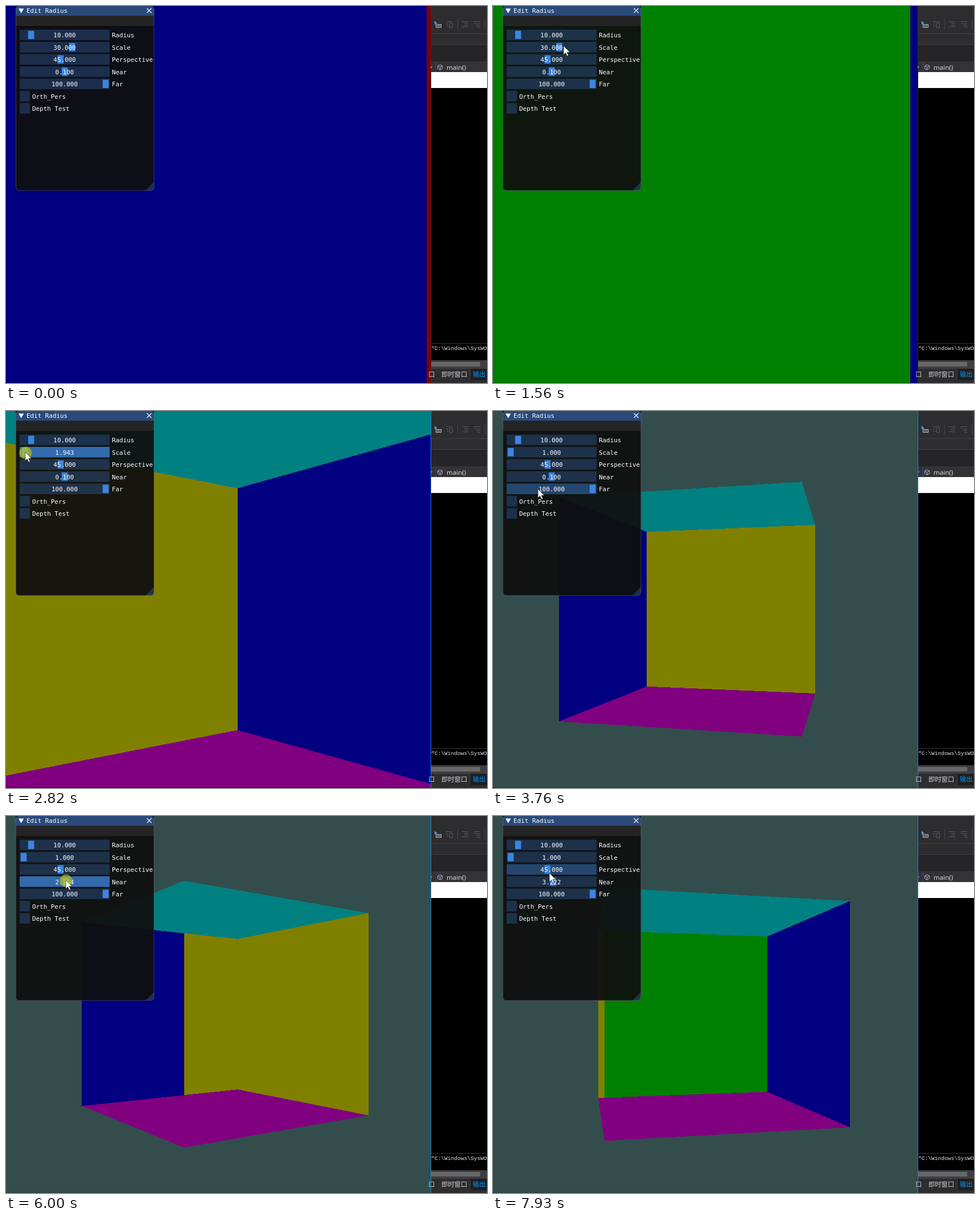
Animation, 845 px wide and 662 px high, one loop 8000 ms. Source, as an HTML page:

```html
<!DOCTYPE html>
<html lang="zh">
<head>
<meta charset="utf-8">
<title>Edit Radius</title>
<style>
  html, body { margin: 0; width: 100%; height: 100%; overflow: hidden; background: #334d4d; }
  svg { display: block; width: 845px; height: 662px; }
  text { white-space: pre; }
  .gui text { font: 10.9px "DejaVu Sans Mono", monospace; fill: #fff; }
  .crisp { shape-rendering: crispEdges; }
  .mid { text-anchor: middle; }
  .cjk { font: 11.3px "Noto Sans CJK SC", "Noto Sans CJK", sans-serif; }
</style>
</head>
<body>
<svg viewBox="0 0 845 662">
  <clipPath id="view"><rect width="746" height="662"/></clipPath>
  <g clip-path="url(#view)">
    <rect width="746" height="662" fill="#334d4d"/>
    <g id="cube" class="crisp"></g>
    <rect y="660" width="746" height="2" opacity=".12"/>
  </g>

  <g id="side">
    <g class="crisp">
      <rect x="746" width="99" height="662" fill="#2d2d30"/>
      <path d="M747 48.5h98M747 67.5h98" stroke="#414146"/>
      <rect x="747" y="68" width="98" height="29" fill="#252527"/>
      <rect x="747" y="97" width="98" height="19" fill="#333337"/>
      <path d="M755.5 98v18" stroke="#48484d"/>
      <rect x="747" y="116" width="98" height="28" fill="#fff"/>
      <rect x="747" y="144" width="98" height="478"/>
      <rect x="747" y="622" width="98" height="15" fill="#3e3e42"/>
      <rect x="747" y="625" width="86" height="8" fill="#686868"/>
      <rect x="747" y="637" width="98" height="25" fill="#2d2d30"/>
      <rect x="816" y="637" width="29" height="20" fill="#1e1e20"/>
      <path d="M815.5 638v19" stroke="#3f3f46"/>
      <path d="M747 592.5h98" stroke="#333"/>
    </g>
    <g fill="none" stroke="#5a5a5e">
      <path d="M793.5 23v18M841.5 23v18" stroke="#46464a"/>
      <path d="M773 27.5h11M773 31.5h4M779.5 30v8h5v-8zM774 35.5h4"/>
      <path d="M801 27.5h11M805 30.5h7M805 33.5h7M801 36.5h11"/>
      <path d="M822 27.5h11M826 31.5h7M826 34.5h7M828 37.5h5M822 29l3 3"/>
      <path d="M755.5 32.5h9v5h-9zM757 35h6" stroke="#d0d0d0"/>
      <path d="M753 26v7l2-2h3z" fill="#55aaff" stroke="none"/>
      <path d="M762.5 103l4 2.2v4.6l-4 2.2-4-2.2v-4.6zM758.5 105.2l4 2.3 4-2.3M762.5 107.5v4.5" stroke="#a8b4d8"/>
    </g>
    <path d="M746 106h3l-3 4z" fill="#999"/>
    <text x="774" y="112" fill="#e4e4e4" style="font:11.6px 'Open Sans',sans-serif">main()</text>
    <text x="747" y="604" fill="#e8e8e8" style="font:9.6px 'Liberation Mono',monospace">“C:\Windows\SysWOW64</text>
    <text class="cjk" x="742" y="651" fill="#d0d0d0">口</text>
    <text class="cjk" x="765" y="651" fill="#d0d0d0">即时窗口</text>
    <text class="cjk" x="820" y="651" fill="#0097fb">输出</text>
  </g>
  <path id="edge" class="crisp" d="M746.5 0v662" stroke="#1883d7"/>

  <g class="gui">
    <path d="M17 0H260V318a6 6 0 0 1-6 6H23a6 6 0 0 1-6-6z" fill="#0f0f0f" fill-opacity=".94"/>
    <path d="M17 17V4a6 6 0 0 1 4-4H256a6 6 0 0 1 4 4V17z" fill="#294a7a"/>
    <rect x="17" y="17" width="243" height="18" fill="#242424"/>
    <path d="M260 309v9a6 6 0 0 1-6 6h-9z" fill="#4296fa" fill-opacity=".25"/>
    <path d="M17.5 3V318a6 6 0 0 0 6 6H254a6 6 0 0 0 6-6V3" fill="none" stroke="#6e6e80" stroke-opacity=".5"/>
    <path d="M22 4.5h9.4l-4.7 8z" fill="#fff"/>
    <path d="M247.5 4l8 8m0-8l-8 8" stroke="#fff" stroke-width="1.1"/>
    <text x="36" y="12">Edit Radius</text>
    <g id="rows"></g>
  </g>

  <circle id="press" r="11" fill="#c8c400" fill-opacity=".65"/>
  <path id="mouse" d="M0 0V15.6l3.6-3.4 2.5 5.7 2.4-1-2.5-5.6h5z" fill="#fff" stroke="#222" stroke-width=".7"/>
</svg>

<script>
const $ = id => document.getElementById(id);
const make = (parent, tag, attrs, text) => {
  const el = document.createElementNS('http://www.w3.org/2000/svg', tag);
  for (const k in attrs) el.setAttribute(k, attrs[k]);
  if (text) el.textContent = text;
  return parent.appendChild(el);
};

const LOOP = 8000, RAD = Math.PI / 180;
const FRAME = 'rgba(41,74,122,.54)', HOVER = 'rgba(66,150,250,.4)', ACTIVE = 'rgba(66,150,250,.67)';

// Sliders: label, lower bound, upper bound, value
const sliders = [
  ['Radius', 1, 100, 10], ['Scale', 1, 50, 30], ['Perspective', 0, 100, 45],
  ['Near', -100, 100, .1], ['Far', -100, 100, 100]
].map(([label, lo, hi, value], i) => {
  const y = 41.5 + i * 21.5, rows = $('rows');
  const bar = make(rows, 'rect', { x: 24, y, width: 158, height: 18.5 });
  const grab = make(rows, 'rect', { y: y + 2, width: 10.5, height: 14.5 });
  const text = make(rows, 'text', { x: 103, y: y + 13.5, class: 'mid' });
  make(rows, 'text', { x: 186, y: y + 13.5 }, label);
  return { lo, hi, value, y, bar, grab, text };
});
['Orth_Pers', 'Depth Test'].forEach((label, i) => {
  const y = 149 + i * 21.5;
  make($('rows'), 'rect', { x: 24, y, width: 18, height: 18.5, fill: FRAME });
  make($('rows'), 'text', { x: 46, y: y + 13.5 }, label);
});

// Mouse path: step, x, y
const path = [
  [15, 743, 250], [16, 755, 240], [17, 520, 170], [18, 300, 110], [19, 150, 76], [20, 124, 70],
  [23, 117, 70], [25, 117, 70], [36, 33.77, 72], [38, 30.5, 72], [40, 31, 73], [48, 79, 137],
  [55, 84, 137], [58, 100, 126.5], [60, 103, 115], [63, 103.07, 114], [66, 103.07, 113],
  [69, 114, 113], [70, 87, 113], [71, 87, 113], [74, 104, 113], [78, 105.32, 112],
  [93, 105.32, 112], [98, 99, 100], [102, 99, 100]
];
function mouseAt(n) {
  const i = path.findIndex(p => p[0] >= n);
  if (i < 1) return path[0].slice(1);
  const [a, x, y] = path[i - 1], [b, u, v] = path[i], k = (n - a) / (b - a);
  return [x + (u - x) * k, y + (v - y) * k];
}

// Drags: slider index, first step, release step
const drags = [[1, 25, 39], [3, 66, 90]];
function valueAt(i, n) {
  const s = sliders[i], drag = drags.find(d => d[0] === i);
  if (!drag || n < drag[1]) return s.value;
  const k = (mouseAt(Math.min(n, drag[2]))[0] - 31) / 144;
  return s.lo + (s.hi - s.lo) * Math.min(1, Math.max(0, k));
}

// Faces in paint order; there is no depth test
const wall = c => [[c - 45, 1], [c + 45, 1], [c + 45, -1], [c - 45, -1]];
const lid = s => [45, 135, 225, 315].map(c => [c, s]);
const faces = [
  ['#800000', wall(180)], ['#008000', wall(0)], ['#000080', wall(90)],
  ['#808000', wall(270)], ['#800080', lid(-1)], ['#008080', lid(1)]
].map(([fill, pts]) => ({ pts, el: make($('cube'), 'polygon', { fill }) }));

function clip(pts, near) {
  const out = [];
  pts.forEach((p, i) => {
    const q = pts[(i + 1) % pts.length];
    if (p[2] >= near) out.push(p);
    if ((p[2] >= near) !== (q[2] >= near)) {
      const k = (near - p[2]) / (q[2] - p[2]);
      out.push(p.map((v, j) => v + (q[j] - v) * k));
    }
  });
  return out;
}

function drawCube(n, scale, near) {
  const look = 110.35 - 4.483 * n, half = 2 * scale, r = half * Math.SQRT2;
  for (const { pts, el } of faces) {
    const world = pts.map(([c, s]) => {
      const d = (c - look) * RAD;
      return [r * Math.sin(d), half * s, 10 + r * Math.cos(d)];
    });
    // A negative near plane hides everything
    const seen = near < 0 ? [] : clip(world, Math.max(near, .05));
    el.setAttribute('points', seen.map(([x, y, z]) =>
      (373 + 901 * x / z).toFixed(2) + ',' + (348 - 845 * y / z).toFixed(2)).join(' '));
  }
}

// The picture advances in steps with one longer pause
function stepAt(t) {
  if (t < 2080) return Math.min(25, Math.floor(t / 78));
  if (t < 2820) return 26 + Math.floor((t - 2080) / 74);
  return Math.min(102, 36 + Math.floor((t - 2820) / 77.3));
}

function draw(n) {
  const [mx, my] = mouseAt(n);
  const drag = drags.find(d => n >= d[1] && n < d[2]);
  sliders.forEach((s, i) => {
    const v = valueAt(i, n), active = drag && drag[0] === i;
    const over = !drag && n > 20 && mx > 24 && mx < 182 && my >= s.y && my < s.y + 18.5;
    s.bar.setAttribute('fill', active ? ACTIVE : over ? HOVER : FRAME);
    s.grab.setAttribute('fill', active ? '#4296fa' : '#3d85e0');
    s.grab.setAttribute('x', 25.8 + 144 * (v - s.lo) / (s.hi - s.lo));
    s.text.textContent = v.toFixed(3);
  });
  drawCube(n, valueAt(1, n), valueAt(3, n));
  const place = (el, x, y, on) => {
    el.setAttribute('transform', `translate(${x} ${y})`);
    el.style.display = on ? '' : 'none';
  };
  place($('mouse'), mx, my, n >= 15);
  place($('press'), mx + .5, my + 1.5, drag);
  $('edge').style.display = n >= 25 ? '' : 'none';
}

const start = performance.now();
let last = -1;
function tick() {
  const n = stepAt((performance.now() - start) % LOOP);
  if (n !== last) draw(last = n);
  requestAnimationFrame(tick);
}
tick();
</script>
</body>
</html>
```
